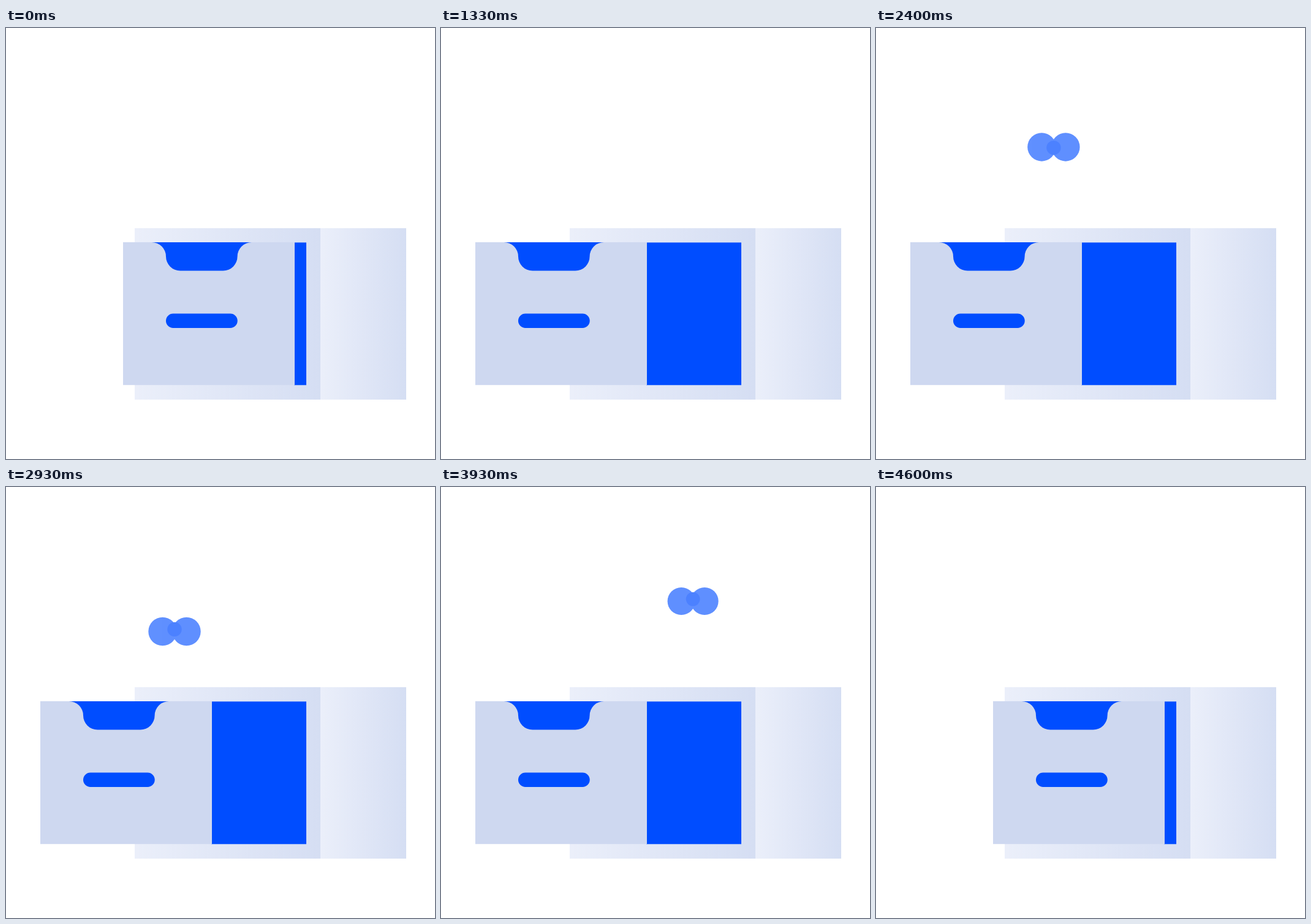
Write an HTML page that moves like this. It is 700 px wide and 704 px high and loops after 6010 ms.

```html
<!DOCTYPE html>
<html lang="en">
<head>
<meta charset="utf-8">
<title>Drawer</title>
<style>
  html, body { margin: 0; width: 100%; height: 100%; overflow: hidden; background: #fff; }
  svg { display: block; width: 100vw; height: 100vh; }
</style>
</head>
<body>
<svg viewBox="0 0 700 704">
  <defs>
    <linearGradient id="side"><stop stop-color="#ebeffa"/><stop offset="1" stop-color="#d5def3"/></linearGradient>
  </defs>
  <rect x="210" y="327" width="303" height="280" fill="url(#side)"/>
  <rect x="513" y="327" width="140" height="280" fill="url(#side)"/>
  <rect id="inner" y="350.4" height="232.9" fill="#004dff"/>
  <g id="moth" fill="#004dff">
    <g opacity=".625">
      <circle cx="-19.5" r="23.2"/>
      <circle cx="19.5" r="23.2"/>
      <circle class="body" r="11.7"/>
    </g>
    <circle class="body" r="11.7" opacity=".2"/>
  </g>
  <g id="front" fill="#004dff">
    <rect width="280" height="233.3" fill="#ced8f0"/>
    <path d="M46.7 0A23.3 23.3 0 0 1 70 23.3A23.3 23.3 0 0 0 93.3 46.6H163.3A23.3 23.3 0 0 0 186.6 23.3A23.3 23.3 0 0 1 210 0Z"/>
    <rect x="70" y="116.7" width="116.7" height="23.3" rx="11.7"/>
  </g>
</svg>
<script>
  const LOOP = 6010, SHUT = 191, OPEN = 56;
  const OPENING = 10, CLOSING = 125, SLIDE = 13;   // in ticks, 30 per second
  const TAKEOFF = 43, STEP = 9;
  const inner = document.getElementById('inner');
  const front = document.getElementById('front');
  const moth = document.getElementById('moth');
  const bodies = document.querySelectorAll('.body');

  // Flight path, one point every STEP ticks
  const path = [
    [380, 405], [300.5, 298.5], [269.5, 257], [294.5, 201], [260, 190], [275, 236],
    [318, 238], [358, 211], [395, 199.3], [441, 188], [448, 420]
  ];
  const LANDING = TAKEOFF + STEP * (path.length - 1);

  const bezier = (a, b, s) => 3 * (1 - s) ** 2 * s * a + 3 * (1 - s) * s * s * b + s ** 3;

  // Eased step that swings past both ends
  function swing(t) {
    if (t <= 0) return 0;
    if (t >= 1) return 1;
    let lo = 0, hi = 1;
    for (let i = 0; i < 30; i++) {
      const mid = (lo + hi) / 2;
      if (bezier(.82, .43, mid) < t) lo = mid; else hi = mid;
    }
    return bezier(-.45, 1.45, lo);
  }

  // Catmull-Rom spline through the path points
  function along(pos, axis) {
    const last = path.length - 1, i = Math.min(Math.floor(pos), last - 1), u = pos - i;
    const [a, b, c, d] = [-1, 0, 1, 2].map(k => path[Math.min(Math.max(i + k, 0), last)][axis]);
    return b + u / 2 * (c - a + u * (2 * a - 5 * b + 4 * c - d + u * (3 * (b - c) + d - a)));
  }

  function draw(now) {
    const tick = Math.floor((now % LOOP) * .03 + .11);

    const out = swing((tick - OPENING) / SLIDE) - swing((tick - CLOSING) / SLIDE);
    const x = SHUT + (OPEN - SHUT) * out;
    front.setAttribute('transform', `translate(${x} 349.9)`);
    inner.setAttribute('x', x + 279);
    inner.setAttribute('width', 490 - x - 279);

    const flying = tick >= TAKEOFF && tick <= LANDING;
    moth.setAttribute('visibility', flying ? 'visible' : 'hidden');
    if (flying) {
      const pos = (tick - TAKEOFF) / STEP;
      const size = 1 - .4 * Math.max(0, (tick - LANDING + 18) / 18) ** 1.5;
      moth.setAttribute('transform', `translate(${along(pos, 0)} ${along(pos, 1)}) scale(${size})`);
      const bob = -.4 - 3.1 * Math.cos((tick - 52) * Math.PI / 3);
      bodies.forEach(b => b.setAttribute('cy', bob));
    }
  }

  const start = performance.now();
  function loop() {
    draw(performance.now() - start);
    requestAnimationFrame(loop);
  }
  loop();
</script>
</body>
</html>
```
